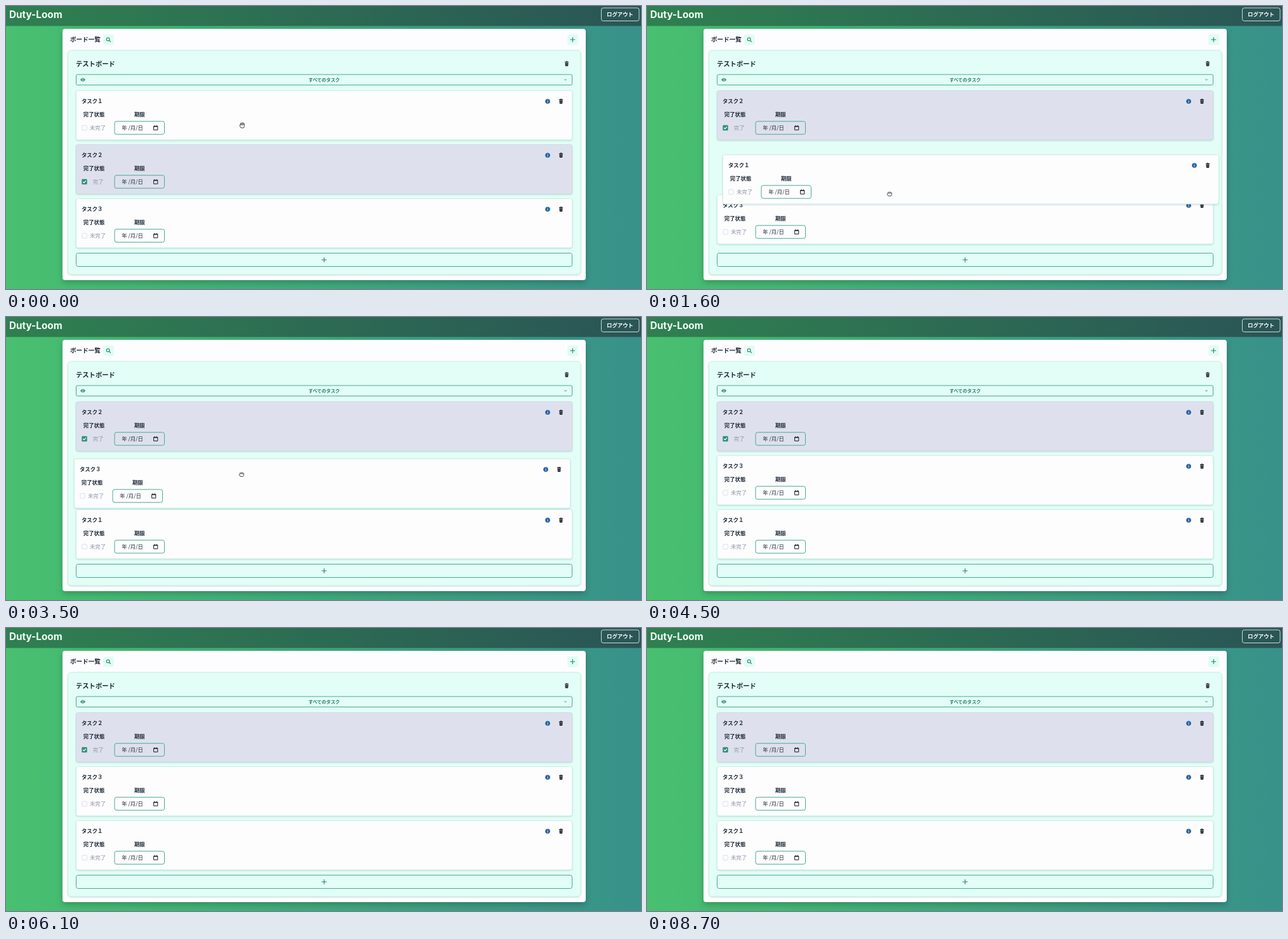
An HTML page for the animation above (8.8 s loop, 1000 px wide and 446 px high).

```html
<!DOCTYPE html>
<html lang="ja">
<head>
<meta charset="utf-8">
<title>Duty-Loom</title>
<style>
  html, body { margin: 0; width: 100%; height: 100%; overflow: hidden; }
  svg { display: block; width: 1000px; height: 446px; }
  text { font: 8.4px "Noto Sans CJK JP", "Noto Sans CJK", "Noto Sans", sans-serif; fill: #1f2a37; }
  .bold { font-weight: 700; }
  .mid { text-anchor: middle; }
  .gray { fill: #8b95a5; }
  .outline { fill: none; stroke: #4aa98e; }
  .panel { filter: drop-shadow(0 4px 5px rgba(0, 0, 0, .2)); }
  .lift { filter: drop-shadow(0 1px 1.2px rgba(0, 40, 30, .16)); }
  .stroke { fill: none; stroke: #24805f; stroke-width: 1.1; stroke-linecap: round; }
</style>
</head>
<body>
<svg viewBox="0 0 1000 446">
  <defs>
    <linearGradient id="page"><stop stop-color="#48c06f"/><stop offset="1" stop-color="#38918a"/></linearGradient>
    <linearGradient id="bar"><stop stop-color="#2f8050"/><stop offset="1" stop-color="#2a5556"/></linearGradient>
    <g id="trash">
      <path d="M-3 -2.7H3M-1-3.4H1" stroke="#161b22" stroke-width="1.1"/>
      <path d="M-2.6-1.6H2.6L2.2 3.2Q2.1 3.8 1.5 3.8H-1.5Q-2.1 3.8-2.2 3.2Z" fill="#161b22"/>
      <path d="M-.9-.7V2.8M.9-.7V2.8" stroke="#fff" stroke-width=".5" opacity=".7"/>
    </g>
    <g id="info">
      <circle r="3.8" fill="#2361a0"/>
      <path d="M0-2.1V-1.1M0-.3V2.1" stroke="#fff" stroke-width="1"/>
    </g>
    <path id="plus" class="stroke" d="M-3.5 0H3.5M0-3.5V3.5"/>
  </defs>

  <rect width="1000" height="446" fill="url(#page)"/>
  <rect width="1000" height="31.5" fill="url(#bar)"/>
  <text x="5" y="19" style="font:700 15.3px Inter,sans-serif;fill:#f4fff8">Duty-Loom</text>
  <rect x="937.5" y="3" width="59.5" height="20.5" rx="3" fill="none" stroke="#dcebe6" stroke-width=".9"/>
  <text class="bold mid" x="967" y="16" style="fill:#fff">ログアウト</text>

  <rect id="panel" class="panel" x="89" y="36" width="824" height="396" rx="4" fill="#fdfdff"/>
  <text class="bold" x="101" y="56.4" style="font-size:9.6px">ボード一覧</text>
  <rect x="153" y="45" width="17" height="16.5" rx="3" fill="#e0fdf5"/>
  <path class="stroke" d="M162.6 54.4L164.6 56.3M163.1 52.4A2.4 2.4 0 1 1 158.3 52.4A2.4 2.4 0 1 1 163.1 52.4"/>
  <rect x="884" y="44.5" width="17" height="17" rx="3" fill="#e0fdf5"/>
  <use href="#plus" x="892.3" y="53"/>

  <text id="empty" class="mid gray" x="501" y="79" style="fill:#718096">ボードがありません。新しいボードを追加してください。</text>

  <g id="board">
    <rect class="lift" x="97.5" y="70" width="807.5" height="353" rx="5" fill="#e2fef6" stroke="#c2f3e5"/>
    <text class="bold" x="110" y="94.6" style="font-size:10.3px">テストボード</text>
    <use href="#trash" x="883" y="91"/>
    <rect class="outline" x="110.5" y="108" width="781" height="16.5" rx="2"/>
    <path d="M117 116.2Q121 110.8 125 116.2Q121 121.6 117 116.2Z" fill="#24805f"/>
    <circle cx="121" cy="116.2" r="1.4" fill="none" stroke="#e2fef6" stroke-width=".8"/>
    <text class="bold mid" x="501" y="118.9" style="font-size:7.2px;fill:#2a8168">すべてのタスク</text>
    <path class="stroke" d="M879.4 115.7L881 117L882.6 115.7" style="stroke-width:.8"/>
    <rect class="outline" x="110.5" y="389.5" width="781" height="21" rx="3"/>
    <use href="#plus" x="501" y="400"/>
    <g id="cards"></g>
  </g>

  <g id="cursor" stroke="#30343a" stroke-width=".9" stroke-linejoin="round" fill="#fff">
    <path id="open" d="M-2 4L-4.2 .2Q-4-1.2-2.4-.4L-3-2.8Q-2.4-4-1.5-2.9Q-1-4.8 .1-3.6Q1.2-4.8 1.8-3Q3.4-3.6 3.3-1.6V1.6L2.4 4ZM-1.4-2.6V0M.2-3.2V0M1.8-2.8V0"/>
    <path id="closed" d="M-2 3.3L-3.7 .8Q-3.7-.6-2.7-.6Q-3-2.7-1.4-2.4Q-.4-3.6 .6-2.5Q2-3.2 2.3-2Q3.8-2 3.5 .2V1.6L2.4 3.3ZM-1.2-1.8V-.2M.5-2V-.2M2.1-1.6V-.2"/>
    <path id="arrow" d="M-3-5V4L-1 2.2L.4 5.2L1.8 4.5L.5 1.7H3.2Z" fill="#111" stroke="#fff"/>
  </g>
</svg>

<script>
const LOOP = 8800, STEP = 100, LEFT = 110, TOP = 133, PITCH = 85;
const GRAB_1 = 300, DROP_1 = 1900, GRAB_3 = 2600, DROP_3 = 3700;
const el = id => document.getElementById(id);
const show = (id, on) => el(id).style.display = on ? '' : 'none';
const clamp = p => Math.max(0, Math.min(1, p));
const mix = (a, b, p) => a + (b - a) * p;

// Fast start, soft landing, as neighbours make room for a dragged card
const slide = (t, start, duration = 330) => 1 - (1 - clamp((t - start) / duration)) ** 3;

// Keys are [time, x, y]
function follow(t, keys) {
  let i = 0;
  while (i < keys.length - 2 && t >= keys[i + 1][0]) i++;
  const [a, b] = [keys[i], keys[i + 1]];
  const p = clamp((t - a[0]) / (b[0] - a[0]));
  const eased = p * p * (3 - 2 * p);
  return [mix(a[1], b[1], eased), mix(a[2], b[2], eased)];
}

function cardMarkup(number, done) {
  const check = done
    ? '<rect x="9.3" y="54.8" width="8.4" height="8.4" rx="1.3" fill="#319078"/><path d="M11.3 59L12.9 60.7L15.8 57.3" fill="none" stroke="#fff" stroke-width="1.2"/>'
    : '<rect x="9.8" y="55.2" width="7.6" height="7.6" rx="1.2" fill="none" stroke="#d9dfe6"/>';
  return `<g id="card${number}">
    <rect class="lift" x=".5" y=".5" width="781" height="77.5" rx="3"
      fill="${done ? '#dee1ed' : '#fdfdfe'}" stroke="${done ? '#cdd9e1' : '#c9f2e7'}"/>
    <text class="bold" x="9" y="20">タスク${'０１２３'[number]}</text>
    <use href="#info" x="743" y="17.2"/><use href="#trash" x="764" y="17.2"/>
    <text class="bold mid" x="28.6" y="41.2">完了状態</text>
    <text class="bold mid" x="100.3" y="41.2">期限</text>
    ${check}
    <text class="gray" x="${done ? 26.8 : 22}" y="62.2">${done ? '完了' : '未完了'}</text>
    <rect class="outline" x="61" y="48.8" width="78.5" height="20.4" rx="3"/>
    <text x="72.3" y="62.2">年 /月/日</text>
    <path d="M122.6 56.5H128.8V62.3H122.6ZM122.6 57H128.8M124 55V56.5M127.4 55V56.5" fill="none" stroke="#161b22"/>
  </g>`;
}
el('cards').innerHTML = cardMarkup(1) + cardMarkup(2, true) + cardMarkup(3);

const drag1 = [[GRAB_1, 0, 0], [800, 4, 58], [1250, 11, 140], [1600, 9, 101], [DROP_1, 6, 88]];
const drag3 = [[GRAB_3, 0, 0], [2900, -2, -11], [3500, -3, -80], [DROP_3, -2, -83]];
const hold1 = [373, 195], hold3 = [374, 328];
const add = (a, b) => [a[0] + b[0], a[1] + b[1]];

function dragOffset(t, keys, dropTime, restY) {
  const [x, y] = follow(t, keys);
  const p = slide(t, dropTime);
  return [mix(x, 0, p), mix(y, restY, p)];
}

function cursorAt(t) {
  if (t < GRAB_1) return follow(t, [[0, 372, 188], [GRAB_1, ...hold1]]);
  if (t < DROP_1) return add(hold1, follow(t, drag1));
  if (t < GRAB_3) return follow(t, [[DROP_1, 379, 283], [2500, ...hold3]]);
  if (t < DROP_3) return add(hold3, follow(t, drag3));
  return follow(t, [[DROP_3, 372, 245], [3900, 372, 245], [4400, 60, -15]]);
}

function place(number, [x, y]) {
  el('card' + number).setAttribute('transform', `translate(${LEFT + x} ${TOP + y})`);
}

function draw(t) {
  const loaded = t < 5600 || t >= 6000;
  show('board', loaded);
  show('empty', !loaded);
  el('panel').setAttribute('height', loaded ? 396 : 54.5);

  const first = dragOffset(t, drag1, DROP_1, PITCH);
  const third = dragOffset(t, drag3, DROP_3, -PITCH);
  place(1, [first[0], first[1] + PITCH * slide(t, 3200)]);
  place(2, [0, PITCH * (1 - slide(t, 720))]);
  place(3, [third[0], 2 * PITCH + third[1] - PITCH * (slide(t, 1180) - slide(t, 1406))]);
  el('cards').append(el(t < 2300 ? 'card1' : 'card3'));

  const [x, y] = cursorAt(t);
  const holding = (t >= GRAB_1 && t < DROP_1) || (t >= GRAB_3 && t < DROP_3);
  show('cursor', t < 4400);
  show('closed', holding);
  show('open', !holding && y >= TOP);
  show('arrow', !holding && y < TOP);
  el('cursor').setAttribute('transform', `translate(${x} ${y})`);
}

const begin = performance.now();
function tick() {
  const t = (performance.now() - begin) % LOOP;
  draw(Math.floor(t / STEP) * STEP);
  requestAnimationFrame(tick);
}
tick();
</script>
</body>
</html>
```
